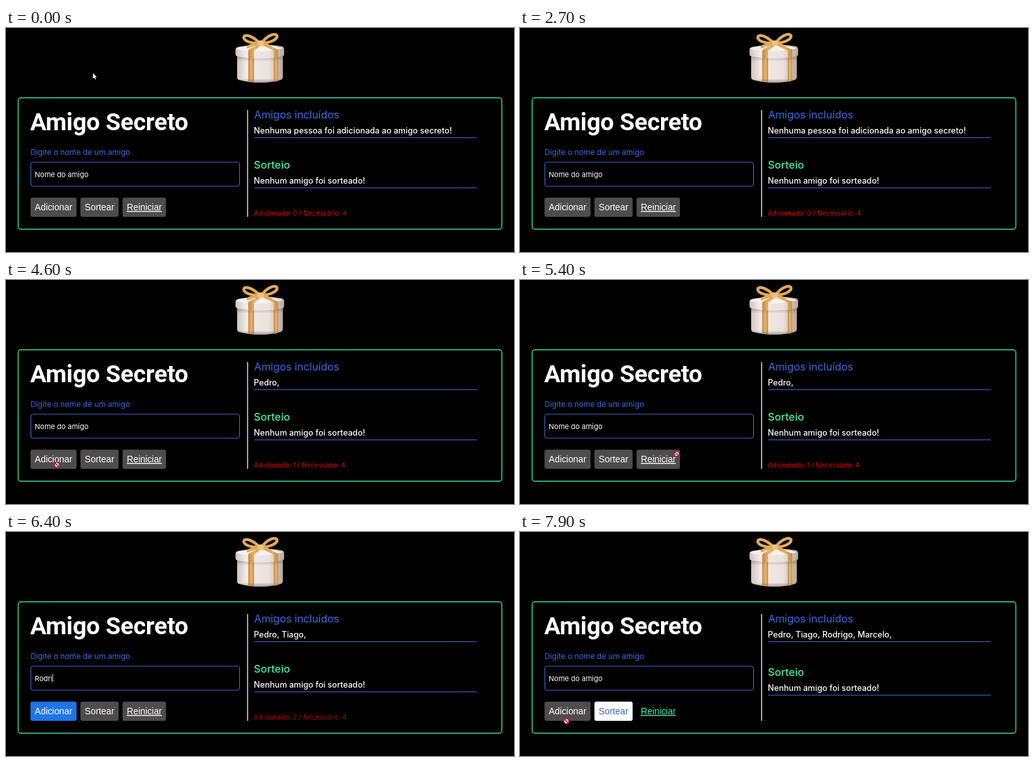
Write an HTML page that moves like this. It is 778 px wide and 344 px high and loops after 8000 ms.

```html
<!DOCTYPE html>
<html lang="pt-BR">
<head>
<meta charset="utf-8">
<title>Amigo Secreto</title>
<style>
html, body { margin: 0; width: 100%; height: 100%; overflow: hidden; background: #000; }
svg { display: block; width: 778px; height: 344px; }
text { font-family: Inter, sans-serif; fill: #fff; }
.title { font: 600 37px Roboto, sans-serif; letter-spacing: -.25px; }
.label { font-size: 11.8px; fill: #3b6ae4; }
.field { font-size: 11px; }
.head { font-size: 16.2px; fill: #3b6ae4; }
.green { font-weight: 500; fill: #45eeb0; }
.body { font-size: 12.6px; font-weight: 500; }
.note { font-size: 10.2px; fill: #e2000f; }
.typing .note { fill: #b0040a; }
.line { stroke: #3a68d6; stroke-width: 1.2; fill: none; }
.btn rect { fill: #4f4c4d; }
.btn text { font: 13.8px "Liberation Sans", Arial, sans-serif; }
.typing #add rect { fill: #1f74e6; }
#reset text { text-decoration: underline; }
.full #draw rect { fill: #fff; }
.full #draw text { fill: #3564c4; }
.full #reset rect { fill: none; }
.full #reset text { fill: #45eeb0; }
.full .note { display: none; }
.full #result { transform: translateY(5px); }
</style>
</head>
<body>
<svg id="stage" viewBox="0 0 778 344">
  <defs>
    <linearGradient id="box">
      <stop offset="0" stop-color="#cfc4bf"/><stop offset=".2" stop-color="#f1ebe8"/>
      <stop offset=".7" stop-color="#e9e2df"/><stop offset="1" stop-color="#b5a6a0"/>
    </linearGradient>
    <linearGradient id="gold">
      <stop offset="0" stop-color="#c48a45"/><stop offset=".5" stop-color="#e9b56a"/>
      <stop offset="1" stop-color="#c98f4a"/>
    </linearGradient>
    <linearGradient id="shade" x2="0" y2="1">
      <stop offset="0" stop-color="#6d5b55" stop-opacity=".5"/>
      <stop offset=".22" stop-color="#6d5b55" stop-opacity="0"/>
      <stop offset=".85" stop-color="#6d5b55" stop-opacity="0"/>
      <stop offset="1" stop-color="#6d5b55" stop-opacity=".55"/>
    </linearGradient>
    <path id="body" d="M354 42V76Q354 79 358 80Q390 88 420 80Q424 79 424 75V42Z"/>
  </defs>

  <g id="gift">
    <use href="#body" fill="url(#box)"/>
    <path d="M371 44H380V83L371 82Z" fill="url(#gold)"/>
    <path d="M410 44H417V81L410 83Z" fill="url(#gold)"/>
    <use href="#body" fill="url(#shade)"/>
    <path d="M351.5 33Q351.5 30 356 29L384 25H397L422 28Q426 29 426 33V40Q426 43 422 44Q390 50 356 44Q351.5 43 351.5 40Z" fill="url(#box)"/>
    <path d="M353 32Q355 29 385 25.5H397L425 31Q400 37 381 36Q360 35 353 32Z" fill="#f6f1ee"/>
    <path d="M371 34L384 26H391L380 35V47H371Z" fill="url(#gold)"/>
    <path d="M392 26H399L417 33V45L410 46V35Z" fill="url(#gold)"/>
    <g fill="none" stroke="#dfa95c" stroke-width="4.4" stroke-linejoin="round">
      <path d="M388 23C380 14 368 9 364.5 13C362 18 372 24 388 23"/>
      <path d="M392 23C398 13 411 7 414.5 11C418 16 406 23 392 23"/>
      <path d="M387 24Q376 25 369 30M393 24Q401 26 407 30"/>
    </g>
    <path d="M386 20Q390 18 394 20L395 26Q390 29 385 26Z" fill="#f0c27c"/>
  </g>

  <rect x="18.6" y="107.2" width="740.8" height="201.8" rx="4" fill="none" stroke="#3bdca5" stroke-width="1.4"/>
  <path d="M370 126V290" stroke="#eee" stroke-width="1.4"/>

  <text class="title" x="37" y="157">Amigo Secreto</text>
  <text class="label" x="37.5" y="195">Digite o nome de um amigo</text>
  <rect class="line" x="38" y="206" width="319.6" height="37" rx="4"/>
  <text class="field" id="field" x="44" y="229"></text>
  <path id="caret" d="M.5 218V231" stroke="#bbb"/>

  <g class="btn" id="add"><rect x="37.5" y="260.5" width="70.5" height="29.5" rx="3"/><text x="44" y="280">Adicionar</text></g>
  <g class="btn" id="draw"><rect x="114" y="260.5" width="58.5" height="29.5" rx="3"/><text x="120.5" y="280">Sortear</text></g>
  <g class="btn" id="reset"><rect x="178.5" y="260.5" width="66.5" height="29.5" rx="3"/><text x="185" y="280">Reiniciar</text></g>

  <text class="head" x="380" y="139">Amigos incluídos</text>
  <text class="body" id="list" x="379.5" y="162"></text>
  <path class="line" d="M380 168.5H721"/>
  <g id="result">
    <text class="head green" x="379.5" y="216.2">Sorteio</text>
    <text class="body" x="379.5" y="239">Nenhum amigo foi sorteado!</text>
    <path class="line" d="M380 245.5H721"/>
  </g>
  <text class="note" id="note" x="379.5" y="288"></text>

  <g id="cursor">
    <path id="arrow" d="M0 0V9L2 7.2 3.5 10.3 5 9.6 3.6 6.6H6.3Z" fill="#fff" stroke="#222" stroke-width=".4"/>
    <g id="denied" fill="#fff" stroke="#b3122b" stroke-width="1.7">
      <circle r="4"/><path d="M-2.8-2.8L2.8 2.8"/>
    </g>
  </g>
</svg>
<script>
const $ = id => document.getElementById(id);
const LOOP = 8000, STEP = 100, NEEDED = 4;

// name, typing start, ms per letter, time added
const entries = [
  ["Pedro", 2800, 150, 4500],
  ["Tiago", 5600, 90, 6100],
  ["Rodrigo", 6200, 50, 6700],
  ["Marcelo", 6900, 60, 7600]
];

// visible stretches of the pointer: time, x, y
const tracks = [
  [[0, 133, 69], [400, 133, 69], [1500, 206, 221], [1900, 206, 221], [2500, 165, 236]],
  [[3600, 130, 246], [3900, 78, 284], [4900, 78, 284], [5300, 226, 302], [5400, 240, 267], [5500, 240, 267]],
  [[7500, 71, 282], [7700, 71, 290.5], [8000, 71, 290.5]]
];

// x range of each button
const buttons = { add: [37, 108], draw: [114, 173], reset: [178, 245] };

const ease = p => p * p * (3 - 2 * p);
const show = (el, on) => el.setAttribute("visibility", on ? "visible" : "hidden");

function pointer(t) {
  const track = tracks.find(k => t >= k[0][0] && t < k[k.length - 1][0]);
  if (!track) return null;
  const i = track.findIndex(k => k[0] > t);
  const [t0, x0, y0] = track[i - 1], [t1, x1, y1] = track[i];
  const p = ease((t - t0) / (t1 - t0));
  return [x0 + (x1 - x0) * p, y0 + (y1 - y0) * p];
}

function typed(t) {
  const e = entries.find(([, start, , end]) => t >= start && t < end);
  return e ? e[0].slice(0, Math.floor((t - e[1]) / e[2]) + 1) : "";
}

function render(t) {
  const text = typed(t);
  const names = entries.filter(e => t >= e[3]).map(e => e[0] + ",");
  const full = names.length >= NEEDED;
  $("stage").classList.toggle("typing", !!text);
  $("stage").classList.toggle("full", full);
  $("field").textContent = text || "Nome do amigo";
  $("list").textContent = names.join(" ") || "Nenhuma pessoa foi adicionada ao amigo secreto!";
  $("note").textContent = `Adicionado: ${names.length} / Necessário: ${NEEDED}`;
  show($("caret"), text);
  $("caret").setAttribute("transform", `translate(${44 + $("field").getComputedTextLength()})`);

  const pos = pointer(t);
  $("cursor").style.display = pos ? "" : "none";
  if (!pos) return;
  const [x, y] = pos;
  const enabled = { add: text, draw: full, reset: full };
  const denied = y >= 260 && y <= 291 &&
    Object.keys(buttons).some(b => !enabled[b] && x >= buttons[b][0] && x <= buttons[b][1]);
  $("cursor").setAttribute("transform", `translate(${x} ${y})`);
  show($("arrow"), !denied);
  show($("denied"), denied);
}

let start = null;
function frame(now) {
  if (start === null) start = now;
  const t = Math.max(0, now - start) % LOOP;
  render(Math.floor(t / STEP) * STEP);
  requestAnimationFrame(frame);
}
render(0);
requestAnimationFrame(frame);
</script>
</body>
</html>
```
